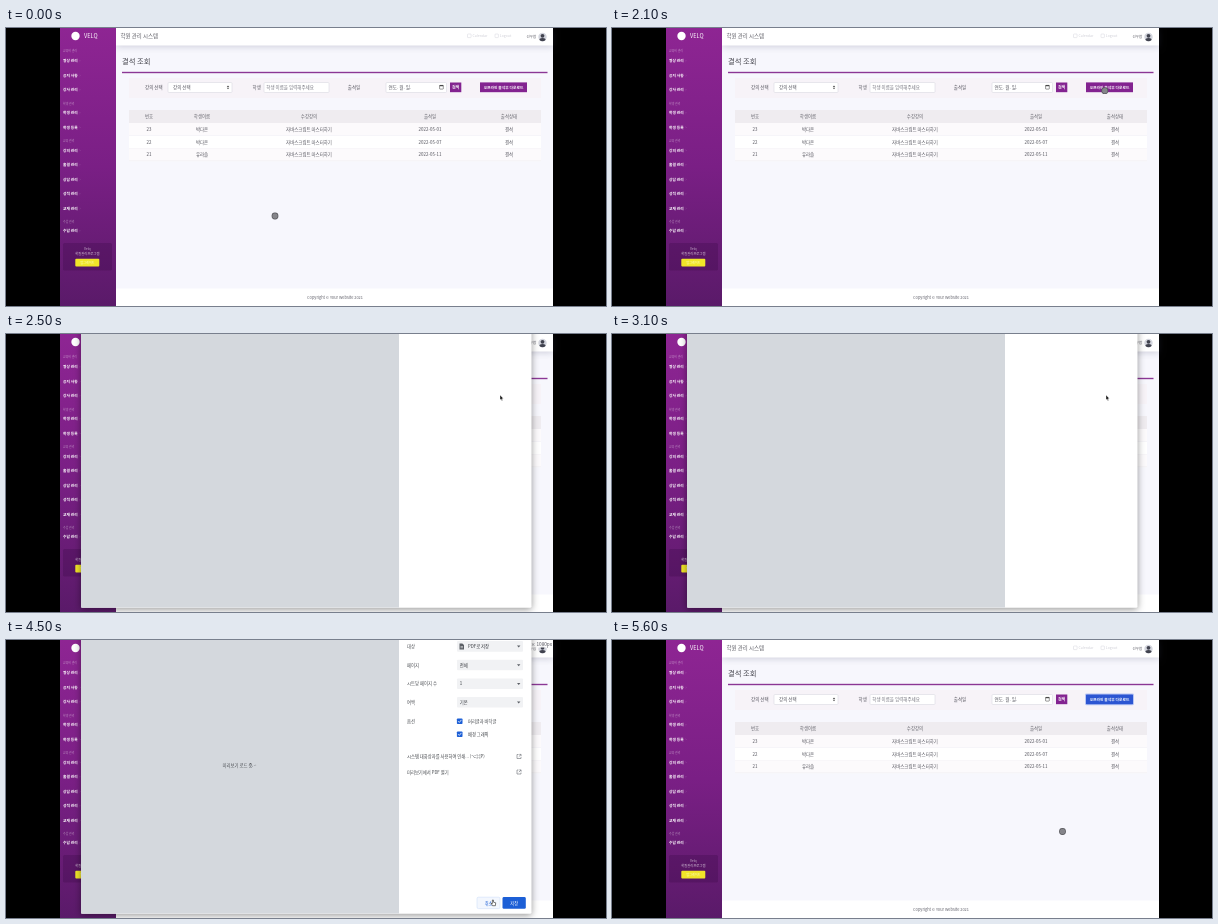
Animation of 600 by 278 pixels, one loop 5700 ms. Source, as an HTML page with a canvas:

```html
<!DOCTYPE html>
<html lang="ko">
<head>
<meta charset="utf-8">
<title>결석 조회</title>
<style>
html, body { margin: 0; width: 100%; height: 100%; overflow: hidden; background: #000; }
canvas { display: block; width: 600px; height: 278px; }
</style>
</head>
<body>
<canvas id="stage"></canvas>
<script>
const W = 600, H = 278, LOOP = 5700;
const FONT = '"Noto Sans CJK KR", "Noto Sans CJK", "Noto Sans", sans-serif';
const PURPLE = '#832390', BLUE = '#1c5fd6';

const canvas = document.getElementById('stage');
const dpr = window.devicePixelRatio || 1;
canvas.width = W * dpr;
canvas.height = H * dpr;
const ctx = canvas.getContext('2d');
ctx.scale(dpr, dpr);

// y is the visual middle of the line
function text(str, x, y, size, color, align = 'left', weight = 400) {
  ctx.font = `${weight} ${size}px ${FONT}`;
  ctx.textAlign = align;
  ctx.fillStyle = color;
  ctx.fillText(str, x, y + size * 0.36);
}

function rect(x, y, w, h, fill) {
  ctx.fillStyle = fill;
  ctx.fillRect(x, y, w, h);
}

function box(x, y, w, h, r, fill, stroke) {
  ctx.beginPath();
  ctx.roundRect(x, y, w, h, r);
  if (fill) { ctx.fillStyle = fill; ctx.fill(); }
  if (stroke) { ctx.strokeStyle = stroke; ctx.lineWidth = 0.5; ctx.stroke(); }
}

function disc(x, y, r, fill) {
  ctx.beginPath();
  ctx.arc(x, y, r, 0, Math.PI * 2);
  ctx.fillStyle = fill;
  ctx.fill();
}

function path(points, fill, stroke, width = 0.6) {
  ctx.beginPath();
  points.forEach(([x, y], i) => i ? ctx.lineTo(x, y) : ctx.moveTo(x, y));
  if (fill) { ctx.closePath(); ctx.fillStyle = fill; ctx.fill(); }
  if (stroke) { ctx.strokeStyle = stroke; ctx.lineWidth = width; ctx.stroke(); }
}

function shadowed(color, blur, dy, draw) {
  ctx.save();
  ctx.shadowColor = color;
  ctx.shadowBlur = blur * dpr;
  ctx.shadowOffsetY = dy * dpr;
  draw();
  ctx.restore();
}

const caret = (x, y, color) => path([[x - 1.7, y - 0.8], [x + 1.7, y - 0.8], [x, y + 1.2]], color);

const SECTIONS = [
  [23, '교육비 관리', [[33, '영상 관리'], [47.5, '공지 사항'], [62, '강사 관리']]],
  [76, '학생 관리', [[85, '학생 관리'], [99.3, '학생 등록']]],
  [113, '교육 관리', [[122.3, '강의 관리'], [137, '출결 관리'], [151.5, '상담 관리'], [166, '성적 관리'], [180.5, '교재 관리']]],
  [194, '수납 관리', [[203, '수납 관리']]]
];

function sidebar() {
  const g = ctx.createLinearGradient(0, 0, 0, H);
  g.addColorStop(0, '#8e2593');
  g.addColorStop(0.5, '#7a1f85');
  g.addColorStop(1, '#5a1a69');
  rect(54, 0, 56, H, g);
  disc(69.5, 8, 4.2, '#fff');
  text('VELQ', 78, 8.2, 5.6, '#fff', 'left', 500);
  for (const [y, title, items] of SECTIONS) {
    text(title, 57, y, 2.9, 'rgba(255,255,255,.5)');
    for (const [iy, label] of items) {
      text(label, 57, iy, 3.75, '#fff', 'left', 700);
      path([[73.6, iy - 0.7], [74.3, iy], [73.6, iy + 0.7]], null, 'rgba(255,255,255,.4)', 0.3);
    }
  }
  box(57, 215, 49, 27.5, 1.5, 'rgba(50,5,60,.25)');
  text('Velq', 81.3, 221, 3.4, 'rgba(255,255,255,.65)', 'center');
  text('학원관리프로그램', 81.3, 226, 3.3, 'rgba(255,255,255,.75)', 'center');
  box(69.3, 230.8, 24, 7.6, 1, '#f0e528');
  text('업그레이드', 81.3, 234.6, 3.1, '#fffbd0', 'center');
}

function topbar() {
  shadowed('rgba(70,75,110,.22)', 6, 1.5, () => rect(110, 0, 437, 17.5, '#fff'));
  text('학원 관리 시스템', 114.5, 8, 5.45, '#5c5c64');
  box(461.5, 6, 3.6, 3.6, 0.5, null, '#d4d4dc');
  text('Calendar', 466.5, 8, 3.5, '#cfcfd7');
  box(489, 6, 3.4, 3.6, 0.5, null, '#d4d4dc');
  text('Logout', 493.8, 8, 3.5, '#cfcfd7');
  text('선우람', 520.5, 8.5, 3.5, '#54545e');
  ctx.save();
  disc(536.5, 9, 4.2, '#d4d6de');
  ctx.clip();
  disc(536.5, 7.8, 1.9, '#41434f');
  ctx.beginPath();
  ctx.ellipse(536.5, 13, 3.5, 2.9, 0, 0, Math.PI * 2);
  ctx.fill();
  ctx.restore();
}

function filters(focused) {
  rect(123, 50, 412, 20, '#f7f3f8');
  const field = (x, w) => box(x, 54.5, w, 10, 1, '#fff', '#d3d3dc');
  text('강의 선택', 139, 59.3, 4.5, '#55555e');
  field(162, 64);
  text('강의 선택', 167, 59.3, 4.5, '#55555e');
  path([[220.8, 58.9], [223.2, 58.9], [222, 57.4]], '#444');
  path([[220.8, 59.8], [223.2, 59.8], [222, 61.3]], '#444');
  text('학생', 246.5, 59.3, 4.5, '#55555e');
  field(258, 65);
  text('학생 이름을 입력해주세요', 260.3, 59.3, 4.5, '#74747e');
  text('출석일', 341.8, 59.3, 4.5, '#55555e');
  field(380, 60.5);
  text('연도. 월. 일.', 382.5, 59.3, 4.6, '#55555e');
  box(433.6, 57.4, 3.7, 3.7, 0.4, null, '#333');
  rect(433.6, 57.2, 3.7, 1, '#333');
  rect(444, 54.5, 11.3, 9.7, PURPLE);
  text('검색', 449.6, 59.3, 4, '#fff', 'center', 700);
  if (focused) {
    box(473, 53.4, 49, 11.8, 1.4, '#b9c6f3');
    box(474, 54.4, 47, 9.8, 0.6, '#2c55d2');
  } else {
    rect(474, 54.4, 47, 9.8, PURPLE);
  }
  text('오프라인 출석부 다운로드', 497.5, 59.3, 3.75, '#fff', 'center', 700);
}

const COLUMNS = [143, 196, 303, 424, 503];
const ROWS = [
  ['23', '박다온', '자바스크립트 마스터하기', '2022-05-01', '결석'],
  ['22', '박다온', '자바스크립트 마스터하기', '2022-05-07', '결석'],
  ['21', '유라솔', '자바스크립트 마스터하기', '2022-05-11', '결석']
];

function table() {
  const line = (cells, y, color) =>
    cells.forEach((c, i) => text(c, COLUMNS[i], y, 4.45, color, 'center'));
  rect(123, 82, 412, 13, '#efecf0');
  line(['번호', '학생이름', '수강강의', '출석일', '출석상태'], 88.3, '#62626a');
  ROWS.forEach((row, i) => {
    const y = 95 + i * 12.7;
    rect(123, y, 412, 12.7, i % 2 ? '#fff' : '#fcfafc');
    rect(123, y + 12.3, 412, 0.4, '#e6e4ea');
    line(row, y + 6.2, '#55555e');
  });
}

function page(t) {
  rect(0, 0, W, H, '#000');
  rect(54, 0, 493, H, '#f7f7fd');
  topbar();
  text('결석 조회', 116, 33, 7.3, '#45454d', 'left', 500);
  rect(116, 43.8, 425.5, 1.4, '#8b3795');
  filters(t >= 2200);
  table();
  rect(110, 260.5, 437, 17.5, '#fff');
  text('Copyright © Your Website 2021', 329, 269.3, 3.9, '#60606a', 'center');
  sidebar();
  if (t >= 4300 && t < 4800) {
    rect(500, 0, 47, 7.5, 'rgba(255,255,255,.92)');
    text('1920px × 1080px', 546, 4, 4.7, '#55555e', 'right');
  }
}

function dropdown(y, label, value) {
  text(label, 401, y, 4.35, '#4a4d52');
  box(451, y - 5.3, 66, 10.6, 1, '#f1f2f4');
  const isPdf = value.startsWith('PDF');
  if (isPdf) {
    path([[453.5, y - 3], [456.3, y - 3], [458, y - 1.3], [458, y + 3], [453.5, y + 3]], '#5b5f65');
    rect(454.5, y, 2.5, 0.5, '#fff');
    rect(454.5, y + 1.2, 2.5, 0.5, '#fff');
  }
  text(value, isPdf ? 462 : 453.7, y, 4.35, '#33363b');
  caret(512.7, y, '#5b5f65');
}

function checkbox(y, label) {
  box(450.9, y - 2.8, 5.6, 5.6, 0.8, BLUE);
  path([[452.1, y], [453.3, y + 1.2], [455.4, y - 1.3]], null, '#fff', 0.8);
  text(label, 462, y, 4.25, '#3f4247');
}

function linkRow(y, label) {
  text(label, 401, y, 4.3, '#3f4247');
  path([[512.5, y - 2], [511, y - 2], [511, y + 2], [515, y + 2], [515, y + 0.5]], null, '#6a6e74', 0.6);
  path([[512.8, y + 0.2], [515, y - 2]], null, '#6a6e74', 0.6);
  path([[513.3, y - 2.1], [515.1, y - 2.1], [515.1, y - 0.3]], null, '#6a6e74', 0.6);
}

function settings(t) {
  const full = t >= 3700;
  const drop = full ? 0 : 5.4;
  dropdown(6.4, '대상', 'PDF로 저장');
  dropdown(25, '페이지', '전체');
  dropdown(43.7 + drop, '시트당 페이지 수', '1');
  dropdown(62.3 + drop, '여백', '기본');
  text('옵션', 401, 81 + drop, 4.35, '#4a4d52');
  checkbox(81.2 + drop, '머리글과 바닥글');
  checkbox(94.2 + drop, '배경 그래픽');
  if (full) {
    linkRow(116.5, '시스템 대화상자를 사용하여 인쇄... (⌥⌘P)');
    linkRow(132, '미리보기에서 PDF 열기');
  }
  const hover = t >= 4150;
  box(471, 257.2, 23, 11.4, 1.4, hover ? '#f3f7fe' : '#fff', hover ? '#c6d8f7' : '#dfe1e5');
  text('취소', 482.5, 263, 4.2, BLUE, 'center', 500);
  box(496.5, 257, 23.3, 11.8, 1.4, BLUE);
  text('저장', 508.2, 263, 4.2, '#fff', 'center', 500);

  text('미리보기 로드 중', 216.5, 125, 4.35, '#4a4d52');
  for (let i = 0; i < 3; i++) {
    const hop = Math.max(0, Math.sin(t / 1000 * Math.PI * 2 - i * 0.9));
    disc(246.6 + i * 1.6, 126.3 - hop * 1.3, 0.35, '#4a4d52');
  }
}

function dialog(t) {
  ctx.save();
  ctx.beginPath();
  ctx.rect(54, 0, 493, H);
  ctx.clip();
  shadowed('rgba(0,0,0,.42)', 7, 1.5, () => box(75, -10, 450.5, 283.7, 1.5, '#fff'));
  if (t >= 2500) rect(75, 0, 318, 273.5, '#d4d8dd');
  if (t >= 3150) settings(t);
  ctx.restore();
}

const MOVES = [
  [0, 269, 188], [150, 269, 188], [1250, 450, 125], [1650, 450, 125], [2150, 494, 61],
  [3700, 494, 61], [4200, 487, 261], [4700, 487, 261], [5000, 450.5, 191.5], [LOOP, 450.5, 191.5]
];

function pointerAt(t) {
  const i = MOVES.findIndex(m => m[0] > t);
  const [t0, x0, y0] = MOVES[i - 1], [t1, x1, y1] = MOVES[i];
  const p = (t - t0) / (t1 - t0), e = p * p * (3 - 2 * p);
  return [x0 + (x1 - x0) * e, y0 + (y1 - y0) * e];
}

function pointer(t, open) {
  const [x, y] = pointerAt(t);
  if (!open) {
    disc(x, y, 3.4, '#55555a');
    disc(x, y, 2.7, '#85858a');
    return;
  }
  ctx.save();
  ctx.translate(x, y);
  ctx.lineJoin = 'round';
  if (t >= 4150) {
    path([[-0.6, -1], [0.4, -1], [0.5, 1.2], [2.7, 1.8], [2.4, 4.7], [-0.5, 4.7], [-2, 2.3], [-0.6, 2.6]], '#fff');
    ctx.closePath();
    ctx.strokeStyle = '#222';
    ctx.lineWidth = 0.6;
    ctx.stroke();
  } else {
    path([[0, 0], [0, 5], [1.1, 4], [1.8, 5.7], [2.7, 5.3], [2, 3.7], [3.4, 3.6]], '#151515', '#fff', 0.4);
  }
  ctx.restore();
}

function render(t) {
  const open = t >= 2300 && t < 4700;
  page(t);
  if (open) dialog(t);
  pointer(t, open);
}

const start = performance.now();
function tick(now) {
  render(Math.max(0, now - start) % LOOP);
  requestAnimationFrame(tick);
}
render(0);
requestAnimationFrame(tick);
</script>
</body>
</html>
```
